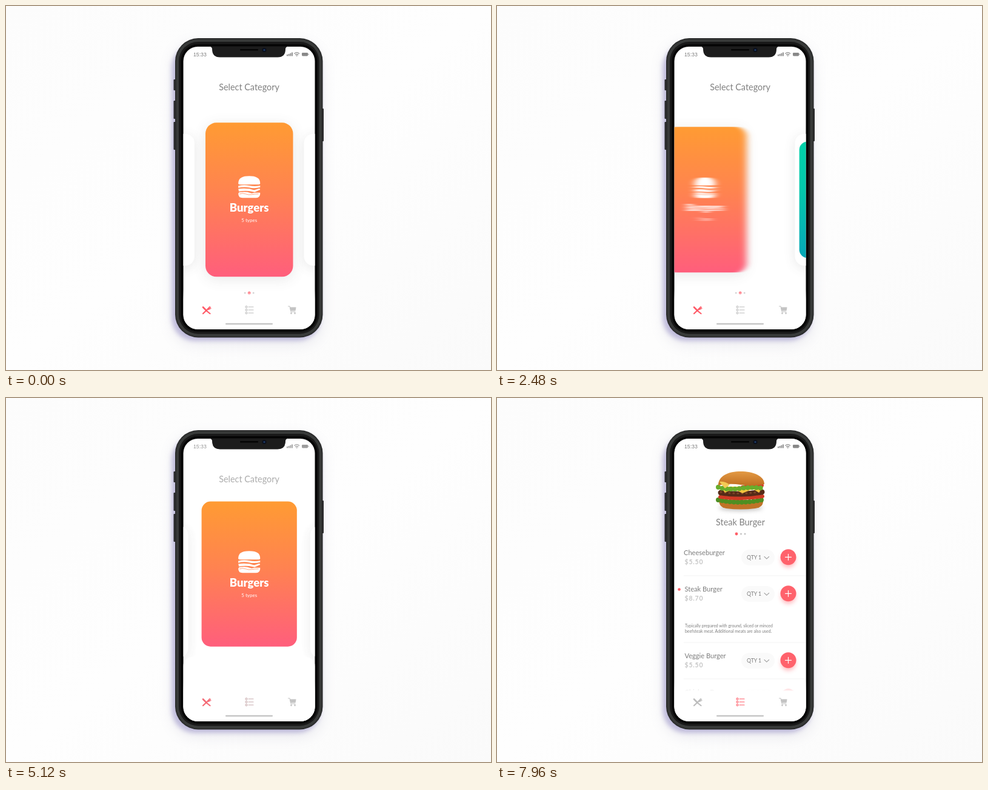
Animation, 800 px wide and 600 px high, one loop 8 s. Source, as an HTML page:

```html
<!DOCTYPE html>
<html lang="en">
<head>
<meta charset="utf-8">
<title>Food ordering app</title>
<style>
  html, body { margin: 0; width: 100%; height: 100%; overflow: hidden; background: #fdfdfd; }
  svg { display: block; width: 100vw; height: 100vh; }
  text { font-family: Lato, "Open Sans", sans-serif; fill: #7d7d7d; }
  .mid { text-anchor: middle; }
  .title { font-size: 18.5px; font-weight: 900; fill: #fff; }
  .sub { font-size: 8px; fill: #fff; }
  .head { font-size: 14.4px; fill: #808080; }
  .name { font-size: 11.1px; }
  .price { font-size: 10.5px; font-weight: 700; fill: #c6c6c6; letter-spacing: .8px; }
  .qty { font-size: 8.7px; }
  .note { font-size: 6.9px; }
  .clock { font: 8.7px "Liberation Sans", Arial, sans-serif; }
  .line { fill: none; stroke-linecap: round; stroke-linejoin: round; }
</style>
</head>
<body>
<svg viewBox="0 0 800 600">
  <defs>
    <linearGradient id="bg" x2="1" y2="1"><stop stop-color="#fcfcfc"/><stop offset=".5" stop-color="#fefefe"/><stop offset="1" stop-color="#fafafa"/></linearGradient>
    <linearGradient id="fill0" x2="0" y2="1"><stop stop-color="#4dcef3"/><stop offset="1" stop-color="#9390ea"/></linearGradient>
    <linearGradient id="fill1" x2="0" y2="1"><stop stop-color="#ff9b33"/><stop offset=".45" stop-color="#ff8350"/><stop offset="1" stop-color="#ff5e7c"/></linearGradient>
    <linearGradient id="fill2" x2="0" y2="1"><stop stop-color="#00d2aa"/><stop offset=".4" stop-color="#02c8ab"/><stop offset="1" stop-color="#05a7b7"/></linearGradient>
    <linearGradient id="fade" x2="0" y2="1"><stop stop-color="#fff" stop-opacity="0"/><stop offset=".25" stop-color="#fff"/></linearGradient>
    <linearGradient id="bun" x2="0" y2="1"><stop stop-color="#e39a45"/><stop offset="1" stop-color="#c16f22"/></linearGradient>
    <filter id="soft" x="-50%" y="-50%" width="200%" height="200%"><feGaussianBlur stdDeviation="11"/></filter>
    <filter id="soft4" x="-60%" y="-60%" width="220%" height="220%"><feGaussianBlur stdDeviation="3.500"/></filter>
    <clipPath id="screen"><rect x="292.500" y="67" width="217" height="466" rx="24"/></clipPath>

    <g id="label0">
      <g transform="translate(0 -21)">
        <path class="line" stroke="#fff" stroke-width="2.6" d="M4-17.2A17.7 17.7 0 1 0 17.2 4"/>
        <path class="line" stroke="#fff" stroke-width="2.6" d="M6-18.5A19 19 0 0 1 17-9"/>
        <path fill="#fff" d="M0 0V-14A14 14 0 1 0 14 0H8L6-3 3-1ZM3-5L6-15Q12-13 15-7L10-5 7-7Z"/>
        <g fill="#69b5f0"><circle cx="-6" cy="-5" r="2.4"/><circle cx="-6" cy="5" r="2.7"/><circle cx="3" cy="7" r="2.5"/><circle cx="8" cy="3" r="1.7"/><circle cx="-1" cy="1" r="1.3"/><circle cx="9.5" cy="-9.5" r="1.5"/></g>
      </g>
      <text class="mid title" y="19.5">Pizza</text><text class="mid sub" y="37">10 types</text>
    </g>
    <g id="label1">
      <g transform="translate(0 -21)" fill="#fff">
        <path d="M-18-6C-18-15-11-18 0-18S18-15 18-6Q18-4 15-4H-15Q-18-4-18-6Z"/>
        <path d="M-18-1.800Q-9-4 0-2.200T18-2.200V.5Q9 3 0 1T-18 1.500Z"/>
        <path d="M-18 3.200Q-10 1.800 0 3L8 5.200 17 2.500 18 4.500 9 8.500 0 6.800Q-9 6-17 7.500Z"/>
        <path d="M-17 9Q-10 7.500-3 8.500L4 10.500 9 9.500H18V12Q17 18 11 18H-11Q-18 18-18 11Z"/>
        <path class="line" stroke="#ff8250" stroke-width=".7" d="M-16 11.500Q-11 9.500-6 11.500T4 12.500 15 11.500"/>
      </g>
      <text class="mid title" y="19.5">Burgers</text><text class="mid sub" y="37">5 types</text>
    </g>
    <g id="label2">
      <g transform="translate(0 -21)">
        <path class="line" stroke="#00a59b" stroke-width="2.200" d="M-2-17L-6-27M1-17L1-31M3-18L8-30"/>
        <circle cx="9" cy="-14" r="6" fill="#d6fff4"/>
        <path fill="#fff" d="M-9-17H9L6-2Q11 3 11 8 10 17 2 18.500V21H8V23H-8V21H-2V18.500Q-10 17-11 8-11 3-6-2Z"/>
      </g>
      <text class="mid title" y="19.5">Drinks</text><text class="mid sub" y="37">12 types</text>
    </g>
  </defs>

  <rect width="800" height="600" fill="url(#bg)"/>
  <rect x="274" y="62" width="248" height="496" rx="38" fill="#8a86a8" opacity=".16" filter="url(#soft)"/>
  <rect x="273" y="64" width="246" height="488" rx="38" fill="#8279bd" opacity=".42" filter="url(#soft4)"/>
  <g fill="#2b2b2d">
    <rect x="276.500" y="121" width="4" height="18" rx="1"/><rect x="276.500" y="156" width="4" height="30" rx="1"/>
    <rect x="276.500" y="191" width="4" height="46" rx="1"/><rect x="520" y="169" width="4" height="54" rx="1"/>
  </g>
  <rect x="279" y="53" width="243.500" height="493.500" rx="38" fill="#2a2b2b"/>
  <rect x="281" y="55" width="239.500" height="489.500" rx="36" fill="#383a39"/>
  <rect x="285" y="59" width="231.500" height="481.500" rx="32" fill="#191919"/>
  <rect x="288.500" y="63" width="225" height="474" rx="28" fill="#050505"/>

  <g clip-path="url(#screen)">
    <rect x="292" y="67" width="218" height="466" fill="#fff"/>
    <text id="select" class="mid head" x="401" y="139">Select Category</text>
    <g id="cards"></g>
    <g id="dots"></g>
    <g id="header"><rect id="headRect" fill="url(#fill1)"/><use id="headLabel" href="#label1"/></g>
    <rect id="panel" x="292" width="218" height="480" rx="16" fill="#fff"/>
    <g id="detail">
      <ellipse cx="402" cy="181" rx="36" ry="5" fill="#999" opacity=".6" filter="url(#soft4)"/>
      <path fill="#c07328" d="M366 168H439Q440 180 426 182 402 185 378 182 366 180 366 168Z"/>
      <path class="line" stroke="#4f8f22" stroke-width="8" stroke-dasharray="0 6.500" d="M365 168Q402 176 441 167"/>
      <path class="line" stroke="#cf3a24" stroke-width="6" d="M368 163Q402 168 438 162"/>
      <path class="line" stroke="#552a18" stroke-width="9" d="M369 156Q402 161 437 155"/>
      <path class="line" stroke="#7a4426" stroke-width="3" stroke-dasharray="1 6" d="M369 155Q402 160 437 154"/>
      <path fill="#f5c33d" d="M368 146H439L432 156 422 150 405 157 390 150 376 156Z"/>
      <path class="line" stroke="#d83b2a" stroke-width="6" d="M405 147L437 144"/>
      <path class="line" stroke="#68ad2c" stroke-width="8" stroke-dasharray="0 7" d="M365 147Q382 152 402 149T441 149"/>
      <path fill="url(#bun)" d="M365 144C365 128 382 121 402 121S441 128 441 142Q421 146 402 143T365 144Z"/>
      <path fill="#f3ca55" d="M367 138Q376 137 384 143L376 149Z"/>
      <text class="mid head" x="401.500" y="210">Steak Burger</text>
      <circle cx="395" cy="224" r="2.400" fill="#ff5f68"/>
      <g fill="#c4c4c4"><circle cx="402.500" cy="224" r="1.500"/><circle cx="409" cy="224" r="1.500"/></g>
    </g>
    <g id="rows"></g>
    <g id="extra">
      <circle cx="300.500" cy="315.500" r="2.300" fill="#ff5f68"/>
      <text class="note" x="310" y="377.500">Typically prepared with ground, sliced or minced</text>
      <text class="note" x="310" y="386.500">beefsteak meat. Additional meats are also used.</text>
    </g>
    <rect x="292" y="467" width="218" height="66" fill="url(#fade)"/>
    <g id="tab0" class="line" transform="translate(331 501.500)" stroke-width="2.200">
      <path stroke-width="2.600" d="M-6-5L0 1"/><path d="M1 2L5.500 5.500M-6 5.500L2-2"/>
      <path stroke-width="1.200" d="M1.500-2L5-6M2.500-1.500L6.500-5M3-1L7-3"/>
    </g>
    <g id="tab1" class="line" transform="translate(401 501)" stroke-width="1.100">
      <circle cx="-4.500" cy="-5" r="1.500"/><circle cx="-4.500" r="1.500"/><circle cx="-4.500" cy="5" r="1.500"/>
      <path d="M-1-5H7M-1 0H7M-1 5H7"/>
    </g>
    <g class="line" stroke="#c4c4c4" transform="translate(472 501)" stroke-width="1.100">
      <path d="M-6.500-6H-4L-2 3H5"/><path fill="#c4c4c4" d="M-3.500-4H6L5 1H-2.500Z"/>
      <circle cx="-1.500" cy="5.500" r=".9"/><circle cx="4.500" cy="5.500" r=".9"/>
    </g>
    <rect x="362" y="522.800" width="78" height="2.400" rx="1.200" fill="#c6c6c6"/>
    <text id="clock0" class="clock" x="309" y="83">15:33</text>
    <text id="clock1" class="clock" x="311.500" y="83" style="fill:#fff;font-weight:700">9:41</text>
    <g id="status">
      <path d="M463 80h1.800v2.500H463zM465.700 79h1.800v3.500h-1.800zM468.400 77.800h1.800v4.700h-1.800zM471 76.500h1.800v6H471z"/>
      <path class="line" stroke-width="1.300" d="M476 78.200Q479.700 75 483.400 78.200M477.700 80.300Q479.700 78.500 481.700 80.300"/><circle cx="479.700" cy="82" r=".9"/>
      <rect x="488" y="77" width="10" height="5.400" rx="1.300"/><rect x="498.500" y="78.700" width="1" height="2"/>
    </g>
  </g>

  <path fill="#1c1c1c" d="M335 66.500Q340 67 340 71 340 84.500 353 84.500H448Q461 84.500 461 71 461 67 466 66.500Z"/>
  <rect x="386" y="71" width="30" height="2.500" rx="1.200" fill="#050505"/>
  <circle cx="426" cy="72.500" r="3.600" fill="#0a0f1c"/><circle cx="426" cy="72.500" r="1.600" fill="#1d3a66"/>
</svg>

<script>
const $ = id => document.getElementById(id);
const set = (id, attrs) => { for (const k in attrs) $(id).setAttribute(k, attrs[k]); };
const clamp = v => Math.min(1, Math.max(0, v));
const lerp = (a, b, u) => a + (b - a) * u;
const inOut = (u, p) => u < .5 ? (2 * u) ** p / 2 : 1 - (2 - 2 * u) ** p / 2;
const ease = (t, a, b, p = 3) => inOut(clamp((t - a) / (b - a)), p);
const mix = (a, b, u) => `rgb(${a.map((v, i) => Math.round(lerp(v, b[i], u)))})`;

const LOOP = 8000, CX = 401.2, CY = 319.3, STEP = 152, SIDE = .855;
const GRAY = [189, 189, 189], RED = [255, 90, 103];
const DOTS = [[118, 138, 232], RED, [8, 166, 178]];
const FOOD = [['Cheeseburger', '$5.50'], ['Steak Burger', '$8.70'], ['Veggie Burger', '$5.50'],
  ['Chicken Burger', '$6.90'], ['Fish Burger', '$7.20']];
// from, to, leave start/end, enter start/end, easing power, scale of the leaving colour, entering dip
const MOVES = [
  [1, 2, 280, 880, 280, 1040, 3, .855, .08],
  [2, 1, 2080, 2500, 2200, 2700, 2, .755, 0],
  [1, 0, 2920, 3220, 2920, 3440, 3, .74, 0],
  [0, 1, 4040, 4340, 4040, 4560, 3, .74, 0]
];

const blur = id => `<filter id="${id}" x="-30%" y="-40%" width="160%" height="180%" color-interpolation-filters="sRGB">
  <feGaussianBlur id="${id}Amount"/></filter>`;
const box = 'x="-72.2" y="-127" width="144.5" height="254" rx="18"';

$('cards').innerHTML = DOTS.map((_, k) => `${blur('cardBlur' + k)}<g id="card${k}">
  <rect ${box} fill="#555" opacity=".13" transform="translate(0 4)" filter="url(#soft)"/>
  <g id="face${k}"><rect ${box} fill="#fff"/>
  <g id="color${k}"><rect ${box} fill="url(#fill${k})"/><use href="#label${k}"/></g></g></g>`).join('');
$('dots').innerHTML = DOTS.map((_, k) => `<circle id="dot${k}" cy="473"/>`).join('');
$('rows').innerHTML = FOOD.map(([name, price], i) => `${blur('rowBlur' + i)}<g id="row${i}">
  <g id="info${i}"><g id="words${i}"><text class="name" x="${i ? 309.5 : 308}" y="-4.500">${name}</text>
  <text class="price" x="309.500" y="11">${price}</text></g>
  <rect x="403" y="-13" width="55" height="26" rx="13" fill="#fafafa"/>
  <text class="qty" x="412" y="3">QTY 1</text>
  <path class="line" stroke="#a5a5a5" stroke-width="1.100" d="M441-1.500l3.800 3.700 3.800-3.700"/></g>
  <circle cx="480.500" cy="4" r="12" fill="#ff626c" opacity=".45" filter="url(#soft4)"/>
  <circle cx="480.500" cy="-.7" r="13" fill="#ff626c"/>
  <path class="line" stroke="#fff" stroke-width="1.200" d="M475.500-.7h10M480.500-5.700v10"/></g>
  <path id="rule${i}" stroke="#f3f3f3" d="M308 0H509"/>`).join('');

function cardAt(k, t) {
  let x = k - 1, color = k === 1 ? 1 : 0, scale = color ? 1 : SIDE, tint = 1;
  for (const [from, to, o0, o1, i0, i1, p, small, dip] of MOVES) {
    if (t < o0) break;
    const dir = to - from;
    if (k === from) {
      const e = ease(t, o0, o1);
      x = -dir * e;
      scale = lerp(1, SIDE, e);
      tint = lerp(1, small / SIDE, e);
      color = 1 - ease(t, o1 + 20, o1 + 160, 2);
    } else {
      const u = clamp((t - i0) / (i1 - i0)), e = inOut(u, p);
      x = k - from - dir * e;
      if (k === to) {
        color = clamp((t - i0) / 120);
        scale = lerp(SIDE, 1, e) - dip * Math.sin(Math.PI * u);
        tint = 1;
      }
    }
  }
  return { x: x * STEP, color, scale, tint };
}

const rowProgress = (i, t) => clamp((t - 5680 - 60 * i) / (360 + 80 * i));
const rowDrop = (i, t) => 120 * (1 - rowProgress(i, t)) ** 3;

function setBlur(target, id, x, y) {
  set(id + 'Amount', { stdDeviation: `${x} ${y}` });
  set(target, { filter: x + y > .3 ? `url(#${id})` : 'none' });
}

function draw(t) {
  const open = ease(t, 4840, 5640), show = ease(t, 7200, 7920);

  for (let k = 0; k < 3; k++) {
    const c = cardAt(k, t), speed = Math.abs(c.x - cardAt(k, t - 40).x);
    set('card' + k, {
      transform: `translate(${CX + c.x + (k - 1) * 60 * open} ${CY}) scale(${c.scale})`,
      opacity: k === 1 && open > 0 ? 0 : 1 - open
    });
    set('color' + k, { opacity: c.color, transform: `scale(${c.tint})` });
    setBlur('face' + k, 'cardBlur' + k, c.color ? speed * .27 : 0, 0);
  }

  const pos = MOVES.reduce((s, m) => s + (m[1] - m[0]) * ease(t, m[2], m[3]), 1);
  DOTS.forEach((color, k) => {
    const d = k - pos, far = Math.min(1, Math.abs(d));
    set('dot' + k, { cx: CX + 7 * d, r: lerp(2.5, 1.5, far), fill: mix(color, GRAY, far), opacity: clamp(2 - Math.abs(d)) });
  });
  const gone = 1 - clamp(open * 2);
  set('select', { opacity: gone });
  set('dots', { opacity: gone });

  set('header', { opacity: open > 0 ? 1 - show : 0 });
  set('headRect', {
    x: lerp(329, 292, open), y: lerp(192.3, 67, open), rx: 18 * (1 - open),
    width: lerp(144.5, 218, open), height: lerp(254, 168, open)
  });
  set('headLabel', { transform: `translate(${CX} ${CY - 162 * open - 60 * show})` });
  set('panel', { y: lerp(lerp(470, 221, open), 50, show), opacity: open > 0 ? 1 : 0 });

  set('detail', { opacity: show, transform: `translate(0 ${30 * (1 - show)})` });
  set('extra', { opacity: clamp(show * 2 - 1) });
  FOOD.forEach((_, i) => {
    const u = rowProgress(i, t), drop = rowDrop(i, t);
    const y = 263 + 60 * i + drop + (i > 1 ? 50 * show : 0);
    const speed = rowDrop(i, t - 40) - drop;
    set('row' + i, { transform: `translate(0 ${y})`, opacity: clamp(u * 8) * (.35 + .65 * u) });
    set('info' + i, { opacity: clamp(.35 + u) });
    setBlur('row' + i, 'rowBlur' + i, 0, Math.max(0, speed - 10) * .2);
    set('rule' + i, { transform: `translate(0 ${y + 30 + (i === 1 ? 50 * show : 0)})`, opacity: u ** 3 });
  });
  set('words1', { opacity: t >= 7000 ? lerp(.8, 1, show) : 1 });

  const light = open * (1 - show);
  set('tab0', { stroke: mix(RED, GRAY, open) });
  set('tab1', { stroke: mix(GRAY, RED, open) });
  set('clock0', { opacity: 1 - light });
  set('clock1', { opacity: light });
  const ink = mix([136, 136, 136], [255, 255, 255], light);
  set('status', { fill: ink, stroke: 'none' });
  $('status').querySelector('.line').setAttribute('stroke', ink);
}

function tick() {
  draw(performance.now() % LOOP);
  requestAnimationFrame(tick);
}
tick();
</script>
</body>
</html>
```
